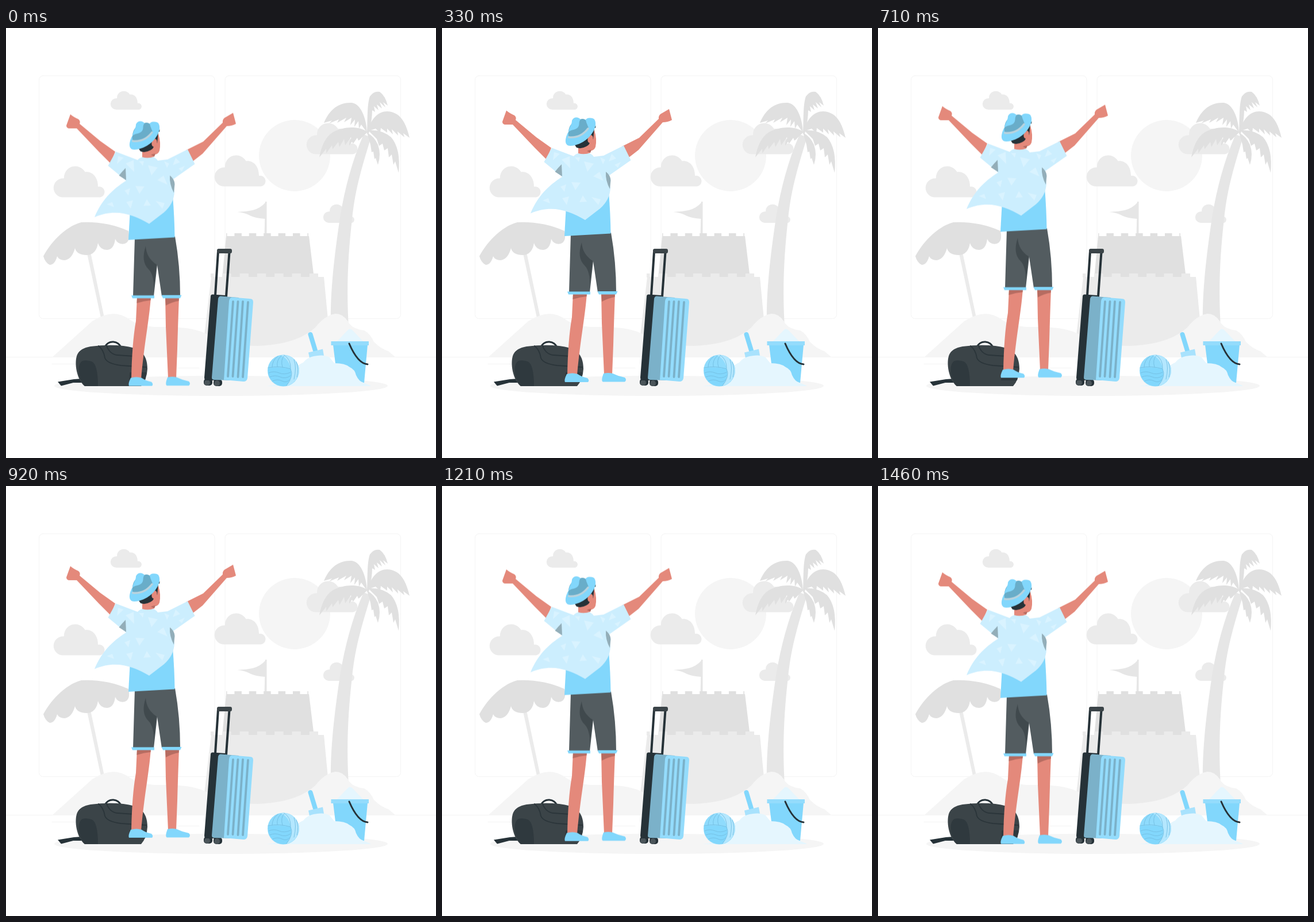
Animation of 748x748 px, one loop 1500 ms. Source, as an HTML page without scripts:

```html
<!DOCTYPE html>
<html lang="en">
<head>
<meta charset="utf-8">
<title>Holiday</title>
<style>
html, body { margin: 0; width: 100%; height: 100%; overflow: hidden; background: #fff; }
svg { display: block; width: 100vw; height: 100vh; }
.sand { fill: #f5f5f5; }
.pale { fill: #ebebeb; }
.mid { fill: #e6e6e6; }
.grey { fill: #e0e0e0; }
.blue { fill: #82d7fc; }
.sky { fill: #94dcfc; }
.teal { fill: #7bb1c9; }
.ice { fill: #e5f6fe; }
.shirt { fill: #cceefe; }
.fold { fill: #93aeb9; }
.skin { fill: #e4897b; }
.shade { fill: #b66c61; }
.ink { fill: #263238; }
.line { fill: none; stroke-linecap: round; stroke-linejoin: round; }
.merlons { fill: none; stroke-linecap: butt; }
.man { animation: hop 1.5s linear -20ms infinite; }
@keyframes hop { 50% { transform: translateY(-15px); } }
</style>
</head>
<body>
<svg viewBox="0 0 748 748">
<defs>
  <path id="cloud" class="pale" d="M16 53.500A16.500 16.500 0 0 1 16.500 20.500Q17 20 18 20.500A19.500 19.500 0 0 1 54.500 9.500C67 8 77 18 77 35A9.300 9.300 0 0 1 81 53.500Z"/>
</defs>

<g class="line" stroke="#f4f4f4">
  <rect x="57.500" y="83" width="305.500" height="422.500" rx="7"/>
  <rect x="381" y="83" width="305.500" height="422.500" rx="7"/>
  <path d="M0 572.500H748M80 584.500H123M300 591.500H336"/>
</g>

<circle class="sand" cx="502" cy="222" r="62"/>
<use href="#cloud" transform="translate(182 110) scale(.61 .6)"/>
<use href="#cloud" x="83" y="241"/>
<use href="#cloud" x="363" y="222"/>
<use href="#cloud" x="523" y="166"/>
<use href="#cloud" transform="translate(552 307) scale(.61 .6)"/>

<g id="umbrella">
  <path class="pale" d="M141 392L147 390 171 504H165Z"/>
  <path class="grey" d="M65 397C76 376 101 346 131 338Q175 336 213 353Q217 371 207 375Q195 378 190 367Q188 385 176 386Q164 386 160 374Q157 394 141 395Q123 395 120 383Q115 402 102 404Q92 404 89 397Q85 412 76 412Q68 408 65 397Z"/>
</g>

<g id="castle">
  <path class="mid" d="M451 302H453.500V362H449.500Z"/>
  <path class="mid" d="M452 303Q442 314 429 317T402 320Q415 321 424 326T452 332Z"/>
  <path class="grey" d="M383 362H527L536 436H376Z"/>
  <path class="merlons" stroke="#e0e0e0" stroke-width="6" stroke-dasharray="12.500 12.900" stroke-dashoffset="11" d="M383 360H526"/>
  <path class="pale" d="M357 433H553L565 560H342Z"/>
  <path class="merlons" stroke="#ebebeb" stroke-width="7" stroke-dasharray="15.300 15" stroke-dashoffset="10" d="M356 430.500H553"/>
</g>

<path id="trunk" class="mid" d="M622 185L635 190C615 255 607 285 602 332C595 395 592 450 596 520H565C564 465 569 410 581 330C589 280 602 231 622 185Z"/>
<g id="fronds" class="grey">
  <path d="M628 184C629 160 628 132 633 119Q640 109 650 111Q660 118 664 135L656 129 660 138 650 129 654 140 645 133 648 143 640 136 642 146 637 143Q637 160 631 184Z"/>
  <path d="M628 182C627 155 616 131 601 130C580 129 563 141 553 165L567 161 562 166 579 159 576 165 592 156 588 164 601 156 599 169 607 159 606 172 613 162 614 175 618 168Z"/>
  <path d="M629 180C635 157 648 145 663 145C684 146 695 161 702 191L691 183 693 190 681 180 682 187 671 176 673 185 663 175 663 182 652 174 651 183 643 175Z"/>
  <path d="M629 181C612 169 586 172 569 181Q551 192 545 225L557 210 557 218 567 204 568 211 578 198 580 207 588 193 590 204 600 190 603 201 611 187 615 195 623 185Z"/>
  <path d="M630 178Q653 176 670 190Q687 210 683 252L677 232 674 238 671 220 666 225 664 209 658 213 655 201 649 205 645 193Z"/>
  <path d="M628 182Q641 189 647 203 653 220 647 238L643 226 641 228 639 215 636 216 634 203Z"/>
  <path d="M628 182Q612 180 602 189 596 197 597 205L603 196 604 201 611 191 613 196Z"/>
</g>

<path class="sand" d="M80 573L150 510Q187 486 215 507Q233 521 270 520Q320 519 344 530Q388 553 437 553Q505 551 538 521Q554 500 573 497Q588 497 597 514Q605 524 623 526Q634 532 640 546Q652 558 665 562L678 573Z"/>
<ellipse class="sand" cx="374" cy="622.500" rx="290" ry="17.500"/>

<g id="bag">
  <path class="line" stroke="#263238" stroke-width="3" d="M172 554Q178 545 187 546Q196 547 200 555"/>
  <path class="ink" d="M90 615.500L118 611 132 610V617L117 617 96 622.500Z"/>
  <path fill="#3b4448" d="M137 623C123 612 118 582 124 568Q129 557 147 554Q179 550 204 553C231 556 246 565 246 593Q245 612 235 623Z"/>
  <path fill="#2f393e" d="M137 623C124 609 123 585 133 579Q140 577 149 580Q160 585 160 623Z"/>
  <path class="line" stroke="#2b353a" stroke-width="2" d="M161 553Q170 560 172 574Q176 584 200 587L244 590M175 553Q181 568 194 569L238 572"/>
  <path fill="#2f393e" d="M215 599H244L242 613H214Z"/>
</g>

<g id="suitcase">
  <g class="line" stroke="#263238" stroke-width="4">
    <path d="M369 389L364 465M388.500 390L383 467"/>
  </g>
  <rect x="367" y="384" width="26" height="8" rx="3" fill="#3b4448"/>
  <g class="ink"><rect x="344" y="610" width="15" height="12" rx="5"/><rect x="361" y="611" width="15" height="12" rx="5"/></g>
  <g fill="#4b555a"><circle cx="350" cy="617" r="5"/><circle cx="367" cy="618" r="5"/></g>
  <path class="ink" d="M360 463.500L382 465 370 613H349Q345 613 345 608L356 467Q356 463 360 463.500Z"/>
  <path class="teal" d="M374 466.500L405 469 392 613 362 612Q358 612 358 608L369 471Q370 466 374 466.500Z"/>
  <path class="sky" d="M394 468.500L425 471Q430 471 430 477L420 609Q419 615 413 615L379 612 388 475Q389 468 394 468.500Z"/>
  <g class="line" stroke="#7bb1c9" stroke-width="3.800">
    <path d="M395 476L386 606M403.500 476L394.500 606M412 476L403.500 607M421 477L412 607"/>
  </g>
</g>

<g id="beach-toys">
  <path class="ice" d="M575 546L594 526Q598 521 603 526L622 546Z"/>
  <path class="blue" d="M569 551H629L623 617Q608 620 592 606L574 592Z"/>
  <path class="sky" d="M565.500 545H631V552H565.500Z"/>
  <path class="line" stroke="#263238" stroke-width="3" d="M597 549Q612 584 629 585"/>
  <path class="line" stroke="#82d7fc" stroke-width="8" d="M529.500 533L538 561"/>
  <path fill="#a8e2fd" d="M526 564.500L551 558.500 553 570 528 574Z"/>
  <path class="ice" d="M453 623Q476 621 486 614L497 603Q505 586 517 582Q524 573 535 571Q553 567 563 573L571 583Q590 583 598 590Q607 594 609 604Q614 615 622 617L634 622V623Z"/>
  <circle cx="482.500" cy="596" r="27.500" fill="#8fdbfc"/>
  <path fill="#b4e7fe" d="M482 568.500Q505 570 510 594Q508 618 487 623Q500 608 495 591Q492 576 478 569Z"/>
  <path class="blue" d="M456 592Q475 589 495 593Q499 609 487 623Q465 624 456 603Z"/>
  <g class="line" stroke="#74bfe2" stroke-width=".9">
    <path d="M456 591Q476 587 495 593Q501 606 488 622M457 600Q466 596 475 600T495 599M459 607Q468 603 477 607T495 605M464 614Q472 610 480 614T493 612M463 590Q463 578 473 571M472 589Q470 578 479 570M481 590Q477 577 484 570M495 592Q496 577 484 569M501 577Q506 590 501 611M505 581Q510 593 506 607"/>
  </g>
</g>

<g class="man">
  <path class="skin" d="M112 150.500Q117 155 126 159Q130 162 128 167L164 197 190 215.500 182 236 161 215 123 175 109 175Q105 174 105 170Z"/>
  <path class="skin" d="M395 148L400 167Q393 171 384 171L342 219 324 233 313 213 343 198 377 165Q376 158 383 155Z"/>

  <path class="skin" d="M228 468H252C249 510 241 545 235 611H218Q219 550 226 510Z"/>
  <path class="skin" d="M277 468H301Q299 520 298 558L296 610H282L278 520Z"/>
  <path class="shade" d="M228 469H252L251.500 474Q240 475 227.500 479ZM277 469H301L300.500 475Q289 477 278 483Z"/>
  <path class="blue" d="M217 609Q227 606 236 609Q243 614 253 616Q257 620 254 623H214Q212 619 217 609Z"/>
  <path class="blue" d="M281 608Q289 606 297 608Q307 613 318 615Q322 619 318 622.500H280Q276 621 281 608Z"/>

  <path fill="#535c60" d="M224 366L294 363Q303 414 303 467H271L263 413 257 467H221Z"/>
  <path fill="#40494d" d="M243 380C237 398 239 411 248 420Q258 430 257 456L262 412C250 404 244 394 243 380Z"/>
  <path class="blue" d="M218 465.500H258V470.500H220ZM270.500 465H305.500L303 470.500H273Z"/>

  <path class="blue" d="M216 315L213 369 293.500 364.500Q293 330 290 292Z"/>
  <path class="shirt" d="M191 215.500L229 230Q233 225 240 224.500H254Q260 225 264 231L281 229 316 211.500 328.500 237 290 264 293 285Q292 306 275 321L249 341C220 324 190 314 154 329.500C166 300 185 281 209 266L177.500 240Z"/>
  <path class="fold" d="M208 244Q202 250 196.500 257L209 265ZM285 257Q293 263 293.500 272L292 287Q284 272 285 257Z"/>
  <path fill="#d9f3ff" d="M195 223L205 226 193 237ZM208 236L222 230 223 251ZM231 232H240L238 240ZM247 239L264 243 253 257ZM275 232L284 236 280 244ZM295 226L303 234 290 239ZM300 245L311 240 306 250ZM225 275L241 276 232 289ZM263 265L274 257 281 273ZM206 283L216 279 213 292ZM175 307L185 303 188 312ZM209 303L221 300 217 315ZM239 310L245 298 252 309ZM260 301L276 305 272 315Z"/>

  <path class="skin" d="M237 211L255 195 265 185Q270 200 267 214Q264 221 258 220L258 224Q248 228 237 225Z"/>
  <path class="shade" d="M252 221Q256 219 260 219L258 224Z"/>
  <path class="ink" d="M230 209L254 192 265 181 263 201Q260 193 258 201Q258 210 251 213Q242 218 234 215ZM263 180L267.500 177 267 181Z"/>
  <ellipse class="skin" cx="258" cy="200" rx="4.500" ry="7" transform="rotate(15 258 200)"/>
  <path class="blue" d="M219 189C213 201 213 212 223 212C245 211 263 194 267 177C268 166 264 162 253 164Z"/>
  <path fill="#69adc9" d="M220 195C219 184 222 175 228 172L240 166C247 163 251 167 251 171L255 181C247 193 232 200 220 195Z"/>
  <path class="blue" d="M220 188C221 179 226 176 226 168C229 161 237 161 241 166C237 171 240 174 237 179C233 185 225 183 220 188Z"/>
  <path class="line" stroke="#b9d3de" stroke-width="3.500" d="M220.500 197Q241 199 254 182"/>
</g>
</svg>
</body>
</html>
```
